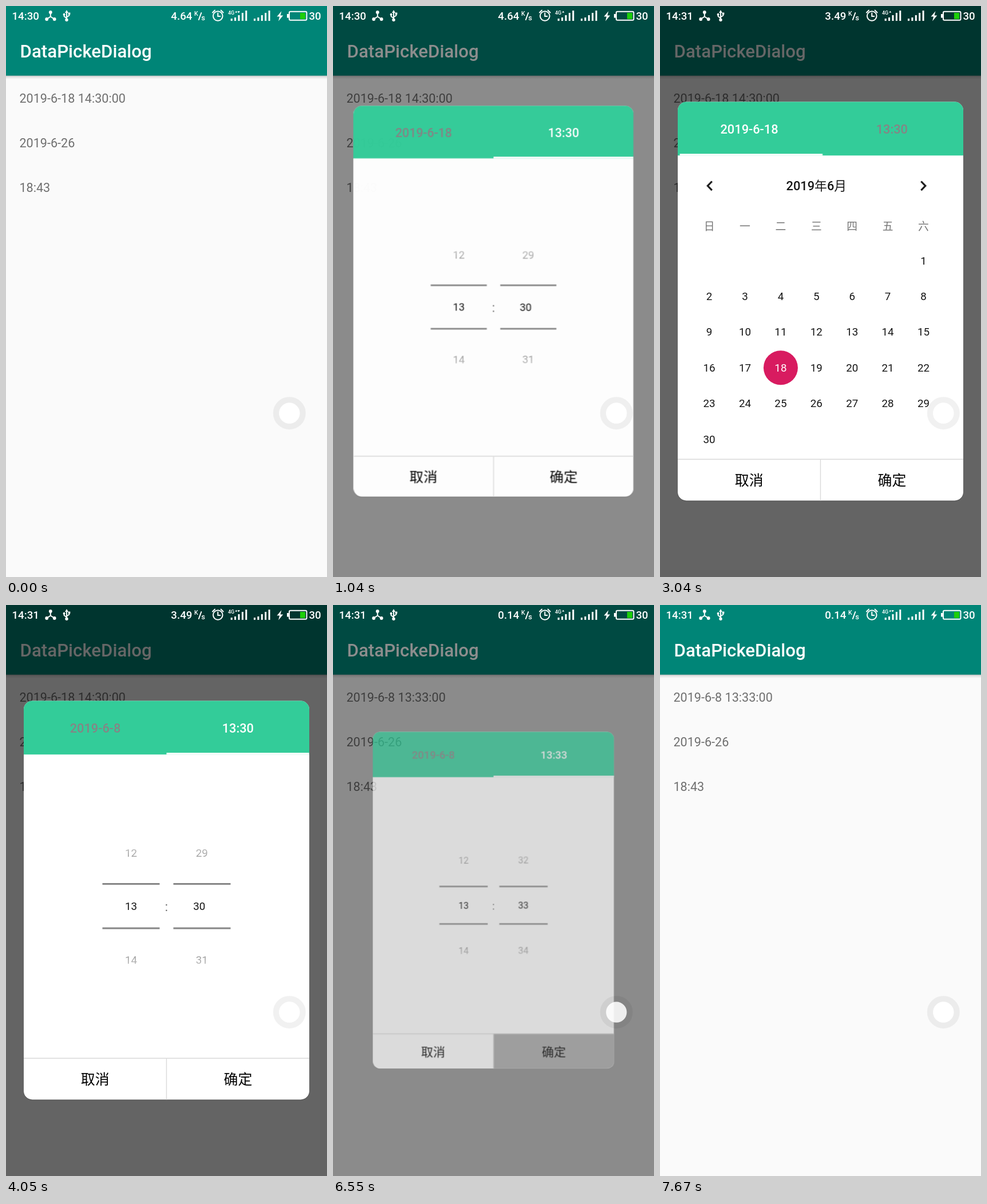
Recreate the animation shown at these times as an HTML page. Size 561 px wide and 998 px high, loop 8 s.

```html
<!DOCTYPE html>
<html lang="zh-CN">
<head>
<meta charset="utf-8">
<title>DataPickeDialog</title>
<style>
html, body { margin: 0; width: 100%; height: 100%; overflow: hidden; background: #fafafa; }
svg { display: block; width: 561px; height: 998px; font-family: Roboto, "Noto Sans CJK SC", "Noto Sans CJK", sans-serif; }
.mid text, text.mid { text-anchor: middle; }
.med { font-weight: 500; }
.rows { font-size: 21.6px; fill: #6f6f6f; }
.num { font-size: 18.8px; fill: #161616; }
.tabs { font-size: 21.8px; font-weight: 500; }
.btns { font-size: 24.9px; fill: #000; }
.status { font-size: 18.7px; font-weight: 500; fill: #fff; }
.line { fill: none; stroke: #fff; stroke-width: 2; stroke-linecap: round; }

#dim { animation: dim 8s infinite; }
#dialog { transform-origin: 280.5px 516px; animation: zoom 8s infinite, fade 8s infinite; }
#pages { animation: slide 8s infinite; }
#mark { animation: mark 8s infinite; }
#minutes { animation: wheel 8s infinite; }
#m30 { animation: nudge 8s infinite step-end; }
#pressed { animation: press 8s infinite step-end; }
#data { animation: data 8s infinite step-end; }

@keyframes dim {
  0%, 11.59% { opacity: 0; animation-timing-function: linear; }
  13.5% { opacity: .6; }
  79.875% { opacity: .6; animation-timing-function: cubic-bezier(.333, .05, .667, .33); }
  84%, 100% { opacity: 0; }
}
@keyframes zoom {
  0%, 11.59% { transform: scale(.7); animation-timing-function: cubic-bezier(.333, .667, .667, 1); }
  13.5% { transform: scale(1); }
  79.875% { transform: scale(1); animation-timing-function: cubic-bezier(.333, .1, .667, .41); }
  84%, 100% { transform: scale(.49); }
}
@keyframes fade {
  0%, 11.59% { opacity: 0; animation-timing-function: cubic-bezier(.333, 1, .667, 1); }
  13.5% { opacity: 1; }
  79.875% { opacity: 1; animation-timing-function: cubic-bezier(.333, .1, .667, .41); }
  84%, 100% { opacity: 0; }
}
@keyframes slide {
  0%, 30.75% { transform: translateX(-499px); animation-timing-function: cubic-bezier(.333, .17, .667, 1); }
  38.625% { transform: none; }
  48.25% { transform: none; animation-timing-function: cubic-bezier(.333, 1, .667, 1); }
  50.6%, 100% { transform: translateX(-499px); }
}
@keyframes mark {
  0%, 30.75% { transform: translateX(249.5px); animation-timing-function: cubic-bezier(.333, .17, .667, 1); }
  38.625% { transform: none; }
  48.25% { transform: none; animation-timing-function: cubic-bezier(.333, 1, .667, 1); }
  50.6%, 100% { transform: translateX(249.5px); }
}
@keyframes wheel {
  0%, 61% { transform: none; animation-timing-function: cubic-bezier(.333, .45, .667, .85); }
  67.125% { transform: translateY(-235.8px); animation-timing-function: cubic-bezier(.22, 1, .36, 1); }
  77.125%, 100% { transform: translateY(-280.5px); }
}
@keyframes nudge {
  0% { transform: translateX(-4.5px); }
  61.2%, 100% { transform: none; }
}
@keyframes press {
  0% { opacity: 0; }
  80.2%, 100% { opacity: 1; }
}
@keyframes data {
  0% { opacity: 1; }
  12.9% { opacity: 0; }
  45.375% { opacity: 1; }
  57.375% { opacity: 0; }
  95.875%, 100% { opacity: 1; }
}
</style>
</head>
<body>
<svg viewBox="0 0 561 998">
  <defs>
    <linearGradient id="shade" x2="0" y2="1">
      <stop stop-opacity=".3"/><stop offset=".4" stop-opacity=".1"/><stop offset="1" stop-opacity="0"/>
    </linearGradient>
    <linearGradient id="edges" x2="0" y2="1">
      <stop stop-color="#fff" stop-opacity="0"/><stop offset=".464" stop-color="#fff"/>
      <stop offset=".536" stop-color="#fff"/><stop offset="1" stop-color="#fff" stop-opacity="0"/>
    </linearGradient>
    <mask id="window" maskUnits="userSpaceOnUse" x="600" y="387" width="400" height="280">
      <rect x="600" y="387" width="400" height="280" fill="url(#edges)"/>
    </mask>
    <clipPath id="card"><rect x="31" y="167.5" width="499" height="697" rx="15"/></clipPath>
  </defs>

  <rect width="561" height="998" fill="#fafafa"/>
  <rect y="121" width="561" height="7" fill="url(#shade)"/>
  <rect width="561" height="121.7" fill="#008577"/>
  <text class="med" x="24.6" y="90" font-size="31.2" fill="#fff">DataPickeDialog</text>
  <g class="rows">
    <text id="stamp" x="23.4" y="169.2"></text>
    <text x="23.4" y="247.2">2019-6-26</text>
    <text x="23.4" y="325.2">18:43</text>
  </g>

  <rect id="dim" width="561" height="998"/>

  <g id="dialog">
    <rect x="31" y="168.5" width="499" height="697" rx="15" fill-opacity=".25"/>
    <g clip-path="url(#card)">
      <rect x="31" y="167" width="499" height="698" fill="#fff"/>
      <rect x="31" y="167" width="499" height="94.3" fill="#3c9"/>
      <rect id="mark" x="31" y="258.3" width="249.5" height="3.2" fill="#fff"/>
      <g class="tabs mid">
        <text id="date" x="156" y="223.2"></text>
        <text id="time" x="405.3" y="223.2"></text>
      </g>
      <g id="pages">
        <g class="num mid">
          <path d="M98 306.5l-7.5 7.8 7.5 7.8M463.5 306.5l7.5 7.8-7.5 7.8" fill="none" stroke="#1f1f1f" stroke-width="3.2"/>
          <text class="med" x="280.5" y="321.5" font-size="21.8">2019年6月</text>
          <g id="week" fill="#757575"></g>
          <circle id="pick" r="30" fill="#d81b60"/>
          <g id="days"></g>
        </g>
        <g class="num mid">
          <g id="hours" mask="url(#window)"></g>
          <g mask="url(#window)"><g id="minutes"></g></g>
          <text x="779.5" y="535" font-size="21.8" fill="#666">:</text>
          <path d="M667.5 487.5h100m24 0h100M667.5 565h100m24 0h100" stroke="#868686" stroke-width="3"/>
        </g>
      </g>
      <rect id="pressed" x="280.5" y="792" width="250" height="73" fill="#a8a8a8"/>
      <path d="M31 792.3h499M280.5 792v73" stroke="#d9d9d9" stroke-width="1.4"/>
      <g class="btns mid">
        <text x="155.7" y="838.3">取消</text>
        <text x="405.5" y="838.3">确定</text>
      </g>
    </g>
  </g>

  <g class="status">
    <text id="clock" x="10.5" y="24.2"></text>
    <text id="speed" x="288.3" y="24.2"></text>
    <text x="329" y="17.2" font-size="10.5">K</text>
    <text x="341.3" y="25.2" font-size="13">s</text>
    <path class="line" d="M341.3 12l-4.4 12" stroke-width="1.3"/>
    <path class="line" d="M77.8 11.5v7l-6.6 4.5m6.6-4.5 6.8 4.5" stroke-width="2.4"/>
    <circle cx="77.8" cy="11" r="2.9"/><circle cx="71.2" cy="23" r="2.9"/><circle cx="84.7" cy="23" r="2.9"/>
    <path class="line" d="M106 11v12M106 21.5l-4.4-3.5v-3M106 19.5l4.4-3v-3" stroke-width="1.7"/>
    <path d="M106 7l3 5h-6zM108.7 11.5h3.6v3.6h-3.6z"/>
    <circle cx="101.6" cy="14.8" r="2"/><circle cx="106" cy="24.3" r="2.7"/>
    <circle class="line" cx="370.3" cy="17.5" r="8.3" stroke-width="2.4"/>
    <path class="line" d="M370.3 12.5v5.5h4M361 11.5l4-4M375.6 7.5l4 4"/>
    <text x="388" y="15.2" font-size="9">4G</text>
    <path d="M400.3 11.5l2-3 2 3z"/>
    <path id="data" d="M404.4 9h4.4l-2.2 3.4z"/>
    <g id="bars"></g>
    <path d="M481.5 9l-8 9.5h4.6l-2 8 8.2-10h-4.8z"/>
    <rect class="line" x="495" y="9.8" width="30.5" height="15" rx="2"/>
    <rect x="491" y="14" width="3" height="6.6"/>
    <rect x="514" y="12" width="9" height="10.8" fill="#1dce0a"/>
    <text x="529.5" y="24.2">30</text>
  </g>

  <circle cx="495.3" cy="711.7" r="23.3" fill="none" stroke="#000" stroke-opacity=".055" stroke-width="10.4"/>
  <circle cx="495.3" cy="711.7" r="18.1" fill="#fff" fill-opacity=".85"/>
</svg>
<script>
const $ = id => document.getElementById(id);
const label = (x, y, s, id = '') => `<text x="${x}" y="${y}" id="${id}">${s}</text>`;
const range = (a, b) => Array.from({ length: b - a + 1 }, (_, i) => a + i);
const ROW = 93.5, CELL = 62.4, ACCENT = '#d81b60';

const cell = d => {
  const i = d + 5;
  return { x: 280.5 + (i % 7 - 3) * CELL, y: 445 + Math.floor(i / 7) * CELL };
};
$('week').innerHTML = [...'日一二三四五六'].map((s, i) => label(280.5 + (i - 3) * CELL, 392, s)).join('');
$('days').innerHTML = range(1, 30).map(d => label(cell(d).x, cell(d).y + 6.6, d, 'd' + d)).join('');
$('hours').innerHTML = range(12, 14).map(h => label(717.6, 533.3 + (h - 13) * ROW, h)).join('');
$('minutes').innerHTML = range(28, 35).map(m => label(841.3, 533.3 + (m - 30) * ROW, m, 'm' + m)).join('');

const bar = (x, h) => `<rect x="${x}" y="${26 - h}" width="3" height="${h}"/>`;
$('bars').innerHTML = [4, 6, 10, 14, 18].map((h, i) => bar(392.7 + i * 6.4, h) + bar(433 + i * 6.4, h)).join('');

// value of the last [start, value] step reached at time t
const at = (t, ...steps) => steps.filter(s => t >= s[0]).pop()[1];
const put = (id, s) => { if ($(id).textContent !== s) $(id).textContent = s; };
const clockAnim = $('minutes').getAnimations()[0];

function draw() {
  const t = (clockAnim.currentTime || 0) % 8000;
  const day = at(t, [0, 18], [3870, 8]);
  const onDate = t >= 2720 && t < 3870;
  const scrolled = -new DOMMatrix(getComputedStyle($('minutes')).transform).f;

  put('clock', at(t, [0, '14:30'], [2335, '14:31']));
  put('speed', at(t, [0, '4.64'], [1285, '3.02'], [1625, '3.49'], [4295, '0.14']));
  put('stamp', at(t, [0, '2019-6-18 14:30:00'], [6415, '2019-6-8 13:33:00']));
  put('date', '2019-6-' + day);
  put('time', '13:' + (30 + Math.round(scrolled / ROW)));
  $('date').style.fill = onDate ? '#fff' : '#858585';
  $('time').style.fill = onDate ? '#858585' : '#fff';

  const { x, y } = cell(day);
  $('pick').setAttribute('cx', x);
  $('pick').setAttribute('cy', y);
  $('d8').style.fill = day === 8 ? '#fff' : '';
  $('d18').style.fill = day === 18 ? '#fff' : ACCENT;
  requestAnimationFrame(draw);
}
draw();
</script>
</body>
</html>
```
